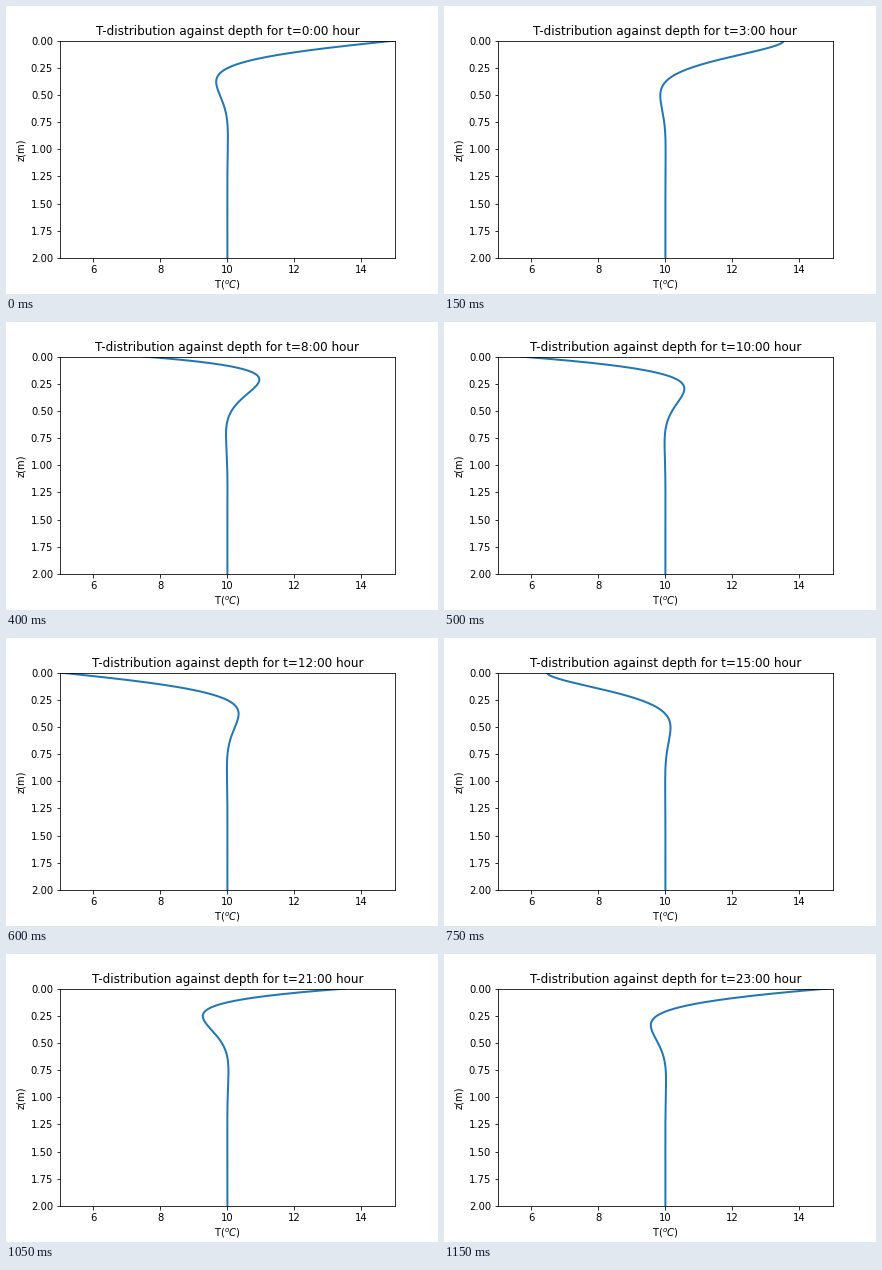
Recreate the animation shown at these times as a matplotlib script. Size 432 by 288 pixels, loop 1200 ms.

```python
import matplotlib.pyplot as plt
import numpy as np
from matplotlib.animation import FuncAnimation

HOURS = 24
MEAN, AMPLITUDE = 10, 5      # degrees Celsius
DAMPING_DEPTH = 0.1616       # metres

plt.rcParams["font.family"] = "DejaVu Sans"

fig, ax = plt.subplots(figsize=(6, 4), dpi=72)
fig.subplots_adjust(left=0.125, right=0.9, bottom=0.125, top=0.88)
ax.set(xlim=(5, 15), ylim=(2, 0), xlabel=r"T($^oC$)", ylabel="z(m)")
ax.set_xticks(range(6, 15, 2))
ax.set_yticks(np.arange(0, 2.01, 0.25))

depth = np.linspace(0, 2, 1000)
line, = ax.plot([], [], lw=2, color="#1f77b4")
title = ax.set_title("")


def temperature(hour):
    """Daily surface wave, damped and delayed with depth."""
    x = depth / DAMPING_DEPTH
    return MEAN + AMPLITUDE * np.exp(-x) * np.cos(2 * np.pi * hour / HOURS - x)


def update(hour):
    line.set_data(temperature(hour), depth)
    title.set_text(f"T-distribution against depth for t={hour}:00 hour")
    return line, title


anim = FuncAnimation(fig, update, frames=HOURS, interval=50,
                     repeat=True, repeat_delay=0, blit=False)
plt.show()
```
